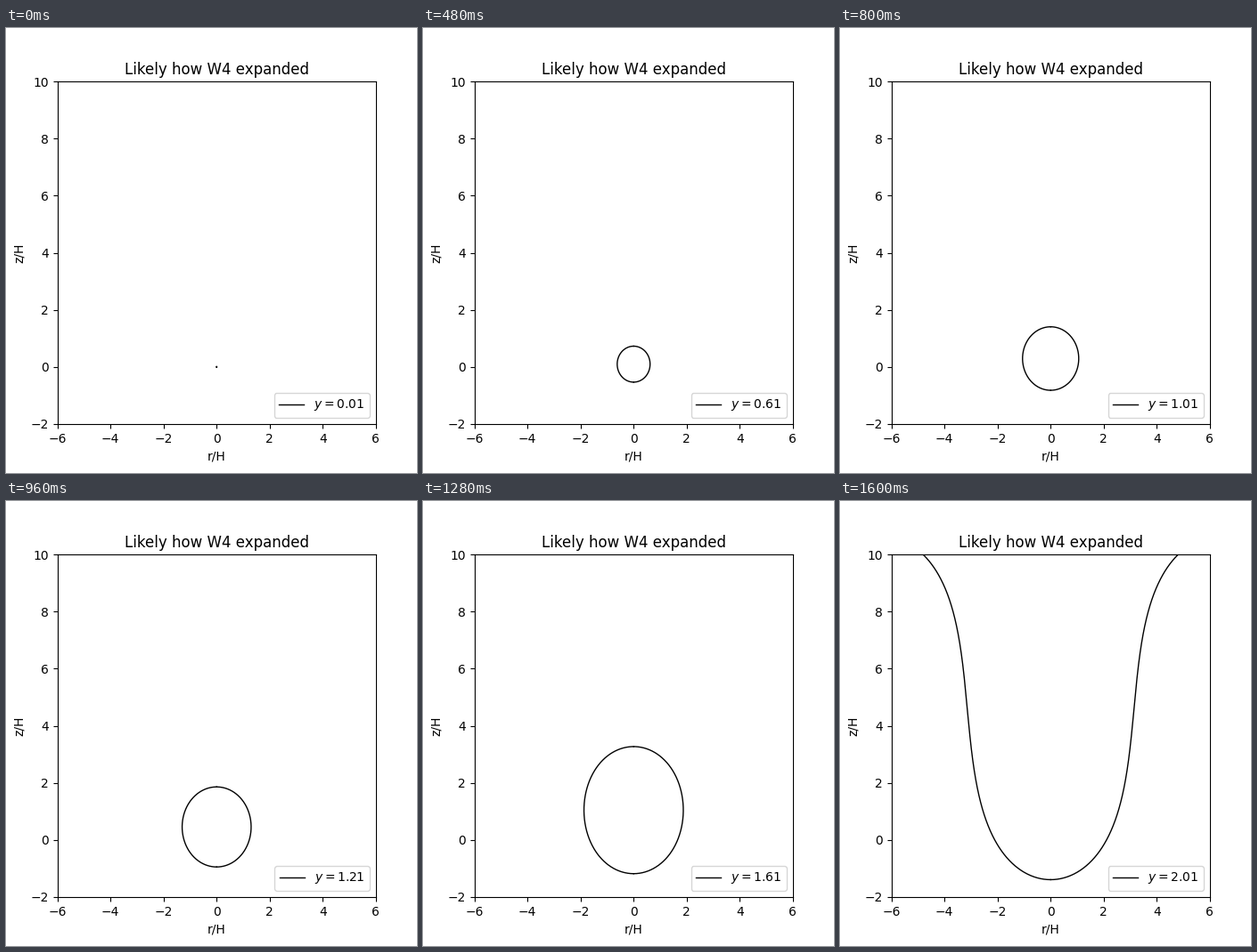
Recreate the animation shown at these times as a matplotlib script. Size 461 by 500 pixels, loop 1.64 s.

```python
import numpy as np
import matplotlib.pyplot as plt
from matplotlib.animation import FuncAnimation

FRAMES, INTERVAL = 41, 40
Y_START, Y_STEP = 0.01, 0.05


def shock_front(y, n=600):
    """Blast wave radius against height in an exponential atmosphere (H = 1)."""
    bottom = -2 * np.log(1 + y / 2)
    top = -2 * np.log(abs(1 - y / 2))
    # Cosine spacing keeps the steep ends near the axis smooth
    z = bottom + (top - bottom) * (1 - np.cos(np.linspace(0, np.pi, n))) / 2
    cos_half_r = 0.5 * np.exp(z / 2) * (1 - y**2 / 4 + np.exp(-z))
    return 2 * np.arccos(np.clip(cos_half_r, -1, 1)), z


fig, ax = plt.subplots(figsize=(4.61, 5), dpi=100)
ax.set(xlim=(-6, 6), ylim=(-2, 10), xlabel="r/H", ylabel="z/H",
       xticks=range(-6, 7, 2), yticks=range(-2, 11, 2),
       title="Likely how W4 expanded")

right, = ax.plot([], [], "k", lw=1, label="$y=0.01$")
left, = ax.plot([], [], "k", lw=1)
legend = ax.legend(handles=[right], loc="lower right")
label = legend.get_texts()[0]


def draw(i):
    y = Y_START + Y_STEP * i
    r, z = shock_front(y)
    right.set_data(r, z)
    left.set_data(-r, z)
    label.set_text(f"$y={y:.2f}$")
    return right, left, label


anim = FuncAnimation(fig, draw, frames=FRAMES, interval=INTERVAL,
                     repeat=True, repeat_delay=0)
plt.show()
```
